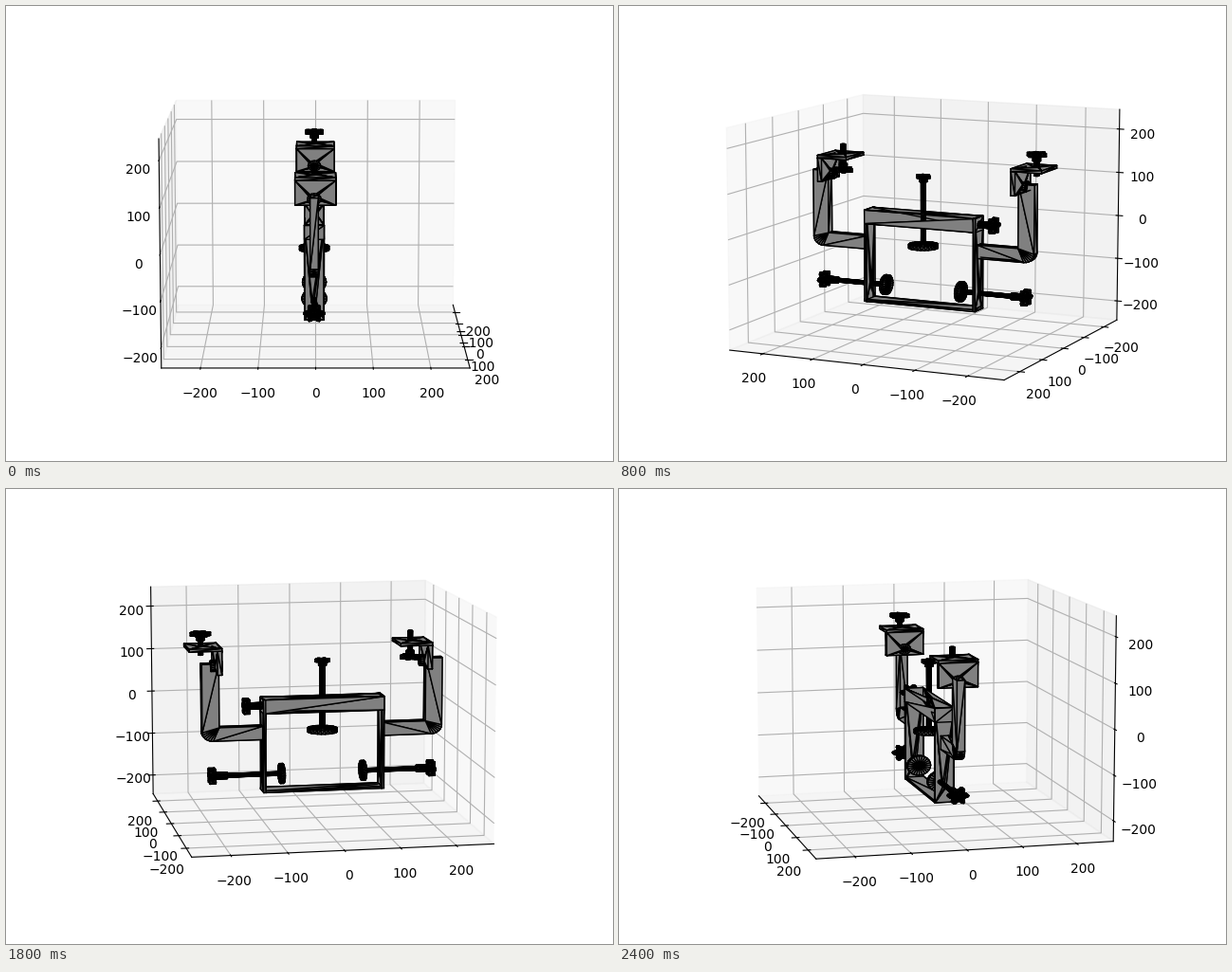
These frames come from a looping animation (640 px wide and 480 px high, 2.5 s). A matplotlib script:

```python
import numpy as np
import matplotlib.pyplot as plt
from matplotlib.animation import FuncAnimation
from mpl_toolkits.mplot3d.art3d import Poly3DCollection

FRAMES = 25
MID_X, MID_Y = 12, -2.5
tris = []


def quad(a, b, c, d):
    tris.extend([(a, b, c), (a, c, d)])


def to_xyz(axis, h, u, v):
    """Point at height h along axis, (u, v) in the plane across it."""
    p = [0, 0, 0]
    p[axis], p[(axis + 1) % 3], p[(axis + 2) % 3] = h, u, v
    return tuple(p)


def plate(lo, hi, axis, hole=None, r=5, n=8):
    """Box whose two faces across axis fan out to a round hole."""
    j, k = (axis + 1) % 3, (axis + 2) % 3
    corners = [(lo[j], lo[k]), (hi[j], lo[k]), (hi[j], hi[k]), (lo[j], hi[k])]
    for a, b in zip(corners, corners[1:] + corners[:1]):
        quad(to_xyz(axis, lo[axis], *a), to_xyz(axis, lo[axis], *b),
             to_xyz(axis, hi[axis], *b), to_xyz(axis, hi[axis], *a))
    for h in (lo[axis], hi[axis]):
        outer = [to_xyz(axis, h, *c) for c in corners]
        if hole is None:
            quad(*outer)
            continue
        ang = 2 * np.pi * np.arange(n + 1) / n - 3 * np.pi / 4
        ring = [to_xyz(axis, h, hole[0] + r * np.cos(t), hole[1] + r * np.sin(t))
                for t in ang]
        step = n // 4
        for q in range(4):
            tris.append((outer[q], outer[(q + 1) % 4], ring[(q + 1) * step]))
            for s in range(q * step, (q + 1) * step):
                tris.append((outer[q], ring[s], ring[s + 1]))


def prism(axis, center, lo, hi, r, n=16, lobe=0):
    """Cylinder along axis; lobe > 0 gives a six-lobed grip."""
    ang = 2 * np.pi * np.arange(n + 1) / n
    rad = r + lobe * np.cos(6 * ang)
    u, v = center[0] + rad * np.cos(ang), center[1] + rad * np.sin(ang)
    ends = [[to_xyz(axis, h, a, b) for a, b in zip(u, v)] for h in (lo, hi)]
    for i in range(n):
        quad(ends[0][i], ends[0][i + 1], ends[1][i + 1], ends[1][i])
        for h, end in zip((lo, hi), ends):
            tris.append((to_xyz(axis, h, *center), end[i], end[i + 1]))


def grip(axis, center, lo, hi, r=18):
    prism(axis, center, lo, hi, 0.8 * r, 36, 0.22 * r)


def flip(x):
    return 2 * MID_X - x


def arm(mirror):
    """L-shaped arm with a rounded outer corner."""
    ang = np.linspace(1.5 * np.pi, np.pi, 7)
    arc = [(-191 + 20 * np.cos(t), -40 + 20 * np.sin(t)) for t in ang]
    inner = [(-100, -30), (-180, -30), (-180, 113)]
    outer = [(-100, -60)] + arc + [(-211, 113)]

    def at(p, y):
        return (flip(p[0]) if mirror else p[0], y, p[1])

    faces = [(inner[0], outer[0], outer[1]), (inner[0], inner[1], outer[1])]
    faces += [(inner[1], a, b) for a, b in zip(arc, arc[1:])]
    faces += [(inner[1], inner[2], arc[-1]), (inner[2], outer[-1], arc[-1])]
    y0, y1 = MID_Y - 7, MID_Y + 7
    for y in (y0, y1):
        tris.extend(tuple(at(p, y) for p in f) for f in faces)
    rim = inner[::-1] + outer
    for a, b in zip(rim, rim[1:] + rim[:1]):
        quad(at(a, y0), at(b, y0), at(b, y1), at(a, y1))


def bracket(dx, grip_up):
    c = (dx - 212, MID_Y)
    plate((dx - 237, -36, 146), (dx - 178, 35, 152), 2, c)
    plate((dx - 186, -36, 93), (dx - 178, 35, 146), 0, (MID_Y, 108))
    prism(0, (MID_Y, 107), dx - 194, dx - 174, 12)
    if grip_up:
        grip(2, c, 176, 183)
        prism(2, c, 166, 176, 7, 12)
        prism(2, c, 133, 166, 4, 10)
    else:
        grip(2, c, 112, 119)
        prism(2, c, 119, 129, 7, 12)
        prism(2, c, 129, 174, 4, 10)


def side_screw(mirror):
    def part(a, b, r, n):
        prism(0, (MID_Y, -140), *((flip(a), flip(b)) if mirror else (a, b)), r, n)

    ends = (flip(-198), flip(-187)) if mirror else (-198, -187)
    grip(0, (MID_Y, -140), *ends)
    part(-187, -165, 7, 12)
    part(-165, -67, 4, 10)
    part(-67, -61, 22, 24)


def build():
    y0, y1 = -20, 15
    # frame
    plate((-100, y0, 0), (124, y1, 31), 2, (MID_X, MID_Y))
    plate((-96, y0, -178), (120, y1, -174), 2)
    plate((-100, y0, -178), (-96, y1, 31), 0, (MID_Y, -140))
    plate((120, y0, -178), (124, y1, 31), 0, (MID_Y, -140))
    for mirror in (False, True):
        arm(mirror)
        side_screw(mirror)
    bracket(0, True)
    bracket(388, False)
    # locking knob on the frame
    grip(0, (MID_Y, 15), -134, -124)
    prism(0, (MID_Y, 15), -124, -100, 7, 12)
    # centre screw
    c = (MID_X, MID_Y)
    grip(2, c, 110, 116, 13)
    prism(2, c, 102, 110, 7, 12)
    prism(2, c, -40, 102, 4, 10)
    prism(2, c, -48, -40, 27, 24)


build()

fig = plt.figure(figsize=(6.4, 4.8), dpi=100)
ax = fig.add_axes((0, 0, 1, 1), projection="3d")
ax.add_collection3d(Poly3DCollection(np.array(tris, float), facecolors="gray",
                                     edgecolors="black", linewidths=1))
ax.set(xlim=(-268, 268), ylim=(-268, 268), zlim=(-245, 245))


def update(i):
    # the tiny offset settles which side pane shows when seen head-on
    ax.view_init(elev=10, azim=i * 360 / FRAMES + 1e-3)
    return ()


anim = FuncAnimation(fig, update, frames=FRAMES, interval=100,
                     init_func=lambda: (), repeat=True)
plt.show()
```
